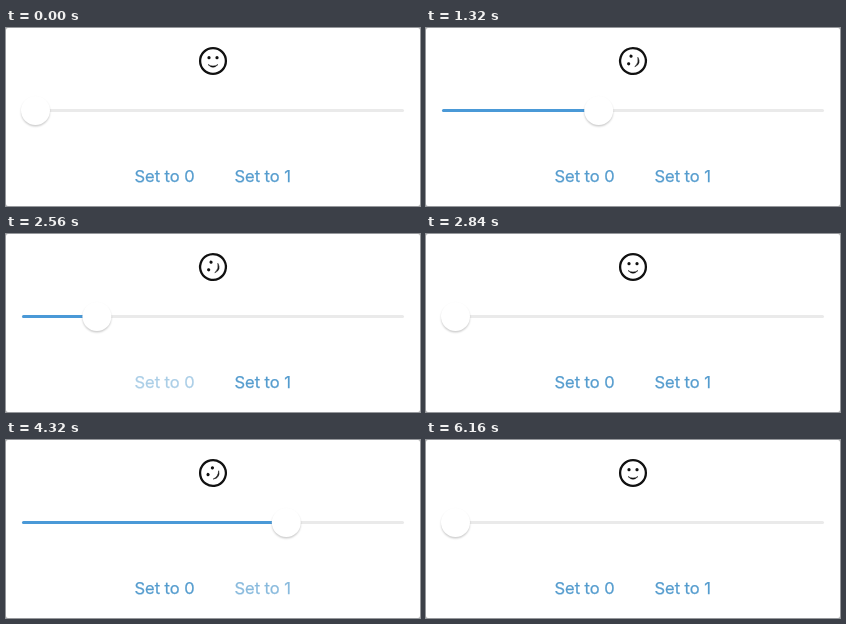
Write an HTML page that moves like this. It is 414 px wide and 178 px high and loops after 6.92 s.

```html
<!DOCTYPE html>
<html lang="en">
<head>
<meta charset="utf-8">
<title>Slider</title>
<style>
@property --pos { syntax: "<number>"; inherits: true; initial-value: 0; }
@property --mood { syntax: "<number>"; inherits: true; initial-value: 0; }

html, body { margin: 0; width: 100%; height: 100%; overflow: hidden; background: #a8a8a8; }

.stage {
  --loop: 6920ms linear infinite;
  position: relative;
  width: 414px;
  height: 178px;
  border-radius: 2px;
  background: #fff;
  overflow: hidden;
}
.stage > * { position: absolute; }

.face {
  left: 192px;
  top: 18px;
  width: 30px;
  height: 30px;
  transform: rotate(calc(-180deg * min(var(--mood), 1 - var(--mood))));
  animation: mood var(--loop);
}

.slider { inset: 0; animation: pos var(--loop); }
.slider > * { position: absolute; }
.track, .fill { left: 16px; top: 81px; height: 3px; border-radius: 1.5px; }
.track { width: 382px; background: #eaeaea; }
.fill { width: calc(13.5px + 355px * var(--pos)); background: #4a99d7; }
.thumb {
  left: 15px;
  top: 68px;
  width: 29px;
  height: 29px;
  border-radius: 50%;
  background: #fff;
  box-shadow: 0 1.5px 2px rgba(0, 0, 0, .2);
  transform: translateX(calc(355px * var(--pos)));
}

.button {
  top: 137px;
  font: 16.5px/22px Inter, sans-serif;
  letter-spacing: -.04px;
  white-space: nowrap;
  color: #559cce;
  -webkit-text-stroke: .25px #559cce;
}
.zero { left: 128.5px; animation: tap-zero var(--loop); }
.one { left: 228.5px; animation: tap-one var(--loop); }

@keyframes pos {
  0% { --pos: 0; }
  14.16% { --pos: 0; animation-timing-function: cubic-bezier(.56, 0, .44, 1); }
  22.54%, 24.57% { --pos: .585; }
  24.86% { --pos: .589; }
  35.55% { --pos: .589; animation-timing-function: cubic-bezier(.33, 1, .68, 1); }
  39.88% { --pos: 0; }
  60.98% { --pos: 0; animation-timing-function: cubic-bezier(.33, 1, .68, 1); }
  65.32% { --pos: 1; }
  84.68% { --pos: 1; animation-timing-function: cubic-bezier(.33, 1, .68, 1); }
  89.02%, 100% { --pos: 0; }
}

@keyframes mood {
  0% { --mood: 0; }
  14.16% { --mood: 0; animation-timing-function: cubic-bezier(.56, 0, .44, 1); }
  22.54%, 24.57% { --mood: .585; }
  24.86% { --mood: .589; }
  35.55% { --mood: .589; animation-timing-function: cubic-bezier(.3, .2, .7, .8); }
  39.88% { --mood: 0; }
  60.98% { --mood: 0; animation-timing-function: cubic-bezier(.3, .2, .7, .8); }
  65.32% { --mood: 1; }
  84.68% { --mood: 1; animation-timing-function: cubic-bezier(.3, .2, .7, .8); }
  89.02%, 100% { --mood: 0; }
}

@keyframes tap-zero {
  0%, 35.55% { opacity: 1; }
  36.13% { opacity: .25; animation-timing-function: cubic-bezier(.5, 1, .89, 1); }
  41.04%, 81.07% { opacity: 1; }
  83.24% { opacity: .3; }
  84.68% { opacity: .3; animation-timing-function: cubic-bezier(.5, 1, .89, 1); }
  89.02%, 100% { opacity: 1; }
}

@keyframes tap-one {
  0%, 57.95% { opacity: 1; }
  59.83% { opacity: .3; }
  60.98% { opacity: .3; animation-timing-function: cubic-bezier(.5, 1, .89, 1); }
  65.32%, 100% { opacity: 1; }
}
</style>
</head>
<body>
<div class="stage">
  <svg class="face" viewBox="-15 -15 30 30">
    <circle r="12.9" fill="none" stroke="#111" stroke-width="2.3"/>
    <circle cx="-4" cy="-3.3" r="1.6" fill="#111"/>
    <circle cx="4" cy="-3.3" r="1.6" fill="#111"/>
    <path d="M-5 3.5Q0 9 5 3.5Q0 6.6 -5 3.5Z" fill="#111" stroke="#111" stroke-width=".5" stroke-linejoin="round"/>
  </svg>
  <div class="slider">
    <div class="track"></div>
    <div class="fill"></div>
    <div class="thumb"></div>
  </div>
  <div class="button zero">Set to 0</div>
  <div class="button one">Set to 1</div>
</div>
</body>
</html>
```
